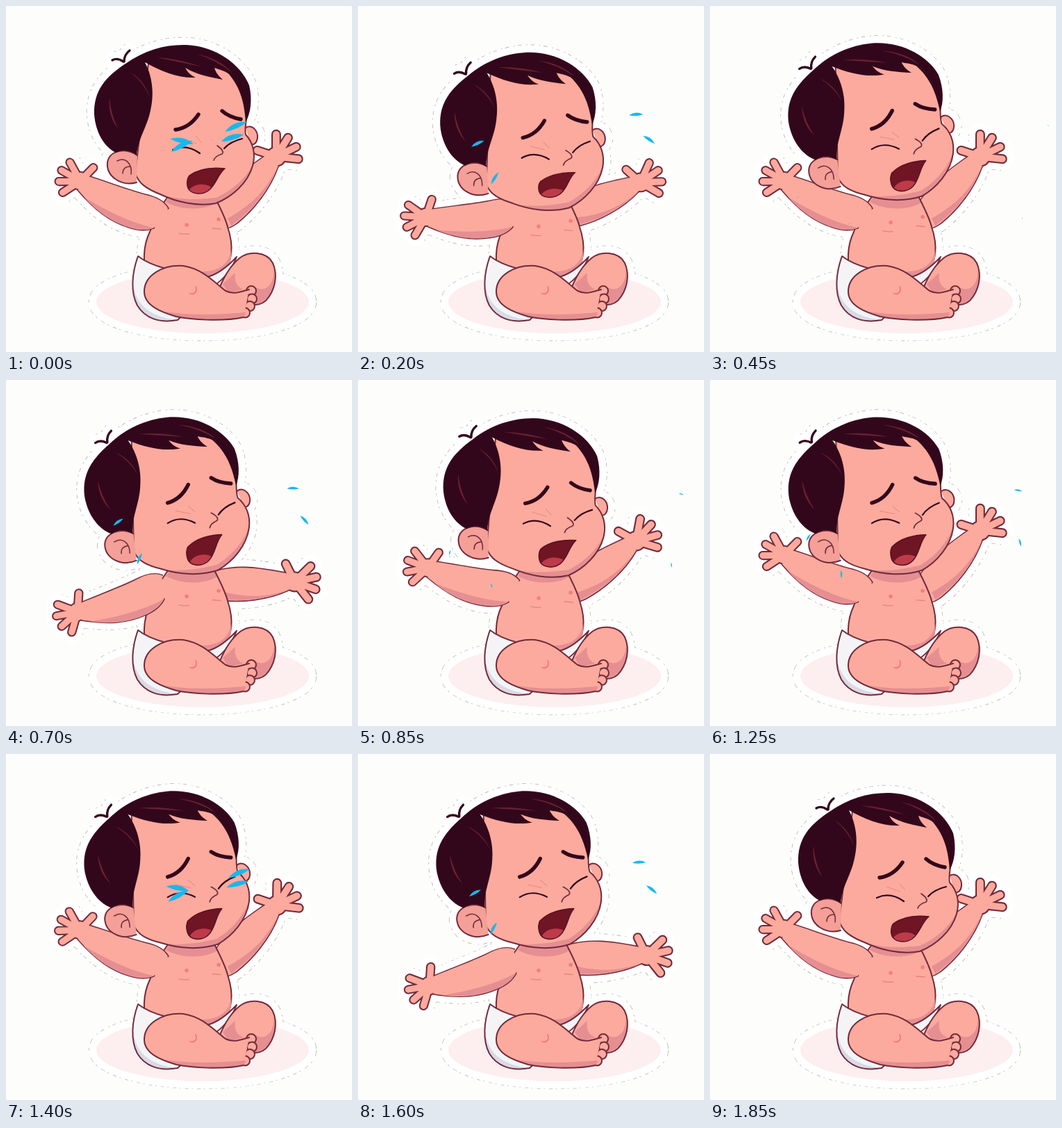
Recreate the animation shown at these times as an HTML page with a canvas. Size 498x498 px, loop 1900 ms.

```html
<!DOCTYPE html>
<html>
<head>
<meta charset="utf-8">
<title>Crying baby</title>
<style>
html, body { margin: 0; height: 100%; overflow: hidden; background: #fdfefc; }
canvas { display: block; }
</style>
</head>
<body>
<canvas id="stage" width="498" height="498"></canvas>
<script>
const ctx = document.getElementById('stage').getContext('2d');
const LOOP = 1900, STEP = 50, SWAY = 925, SOB = SWAY / 2;
const SKIN = '#fcaa9d', SHADE = '#e58f92', LINE = '#722a3b', HAIR = '#33071b', TEAR = '#17b8ee';
const RAD = Math.PI / 180;
const path = d => new Path2D(d);

const ground = new Path2D();
ground.ellipse(283, 426, 153, 45, 0, 0, 7);
const torso = path('M299 272 C308 290 316 305 319 318 C328 345 326 368 312 385 L290 398 L205 390 C196 375 197 345 207 325 C211 315 215 305 222 290 L236 270');
const neckShade = path('M230 282 C250 294 285 295 304 283 L298 270 L240 270Z');
const bellyShade = path('M324 350 C322 372 305 384 275 382 L300 396 C322 382 326 366 324 350Z');
const diaper = path('M190 360 C181 385 179 412 189 431 C200 449 220 457 247 452 L300 402 C315 392 326 376 332 361 C318 376 305 386 290 390 L230 378 C215 374 200 368 190 360Z');
const backLeg = path('M308 404 C316 385 325 372 336 363 C350 352 375 353 384 370 C392 388 387 410 374 424 C366 431 360 430 352 430 L318 412Z');
const backShade = path('M386 378 C386 405 370 412 360 405 L356 430 C372 431 393 405 386 378Z M312 400 L330 384 C328 395 332 405 342 408 L320 413Z');
const frontLeg = path('M350 408 C338 411 328 416 316 410 C298 396 282 378 255 374 C225 372 199 388 199 411 C199 432 225 441 245 447 C265 451 310 455 342 448');
const frontShade = path('M230 440 C265 446 310 444 346 441 L342 448 C310 454 265 451 245 447Z');
const leftArm = path('M228 284 C218 277 206 277 190 281 C165 286 140 288 107 293 L104 317 C140 333 165 337 190 333 C205 331 215 326 222 318');
const leftShade = path('M115 322 C140 333 165 337 190 333 C205 331 215 326 222 318 C190 326 150 326 115 322Z');
const rightArm = path('M298 282 C330 260 355 257 396 250 L402 270 C378 294 345 309 318 315 C305 317 298 315 292 312');
const rightShade = path('M310 315 C345 309 378 294 402 270 C372 294 345 302 310 304Z');
const face = path('M205 82 C260 70 330 80 346 130 C350 155 342 175 345 185 C355 196 360 212 355 230 C348 255 325 275 302 284 C275 289 245 282 222 271 C202 263 190 255 186 240Z');
const faceShade = path('M222 271 C245 279 275 279 302 276 C325 266 346 248 356 226 C350 253 325 275 302 284 C275 289 245 282 222 271Z');
const leftEar = path('M189 215 C172 203 149 208 146 225 C144 245 165 260 188 254');
const earFold = path('M160 223 C172 217 182 227 180 242 M168 241 C168 234 172 231 179 231');
const rightEar = path('M345 175 C355 170 363 180 362 190 C361 197 357 200 352 200');
const hair = path('M158 211 C142 203 129 183 127 156 C126 122 143 102 172 83 C200 63 230 55 260 56 C302 58 338 84 350 114 C355 135 352 155 345 167 C343 140 338 118 320 97 C314 93 308 92 300 89 C302 96 306 101 312 106 C292 102 275 99 258 89 C262 96 266 100 273 103 C248 104 225 95 200 81 C210 100 214 125 208 150 C203 175 190 190 188 215 C179 207 168 206 158 211Z');
const hairShine = path('M149 132 C147 150 152 165 161 176 Q151 156 149 132Z M180 96 Q200 108 207 132 Q198 110 180 96Z M217 74 Q250 76 280 87 Q250 81 217 74Z M275 69 Q308 76 325 96 Q303 78 275 69Z');
const sprig = path('M169 80 Q160 74 153 78 M170 80 Q170 70 178 64');
const brows = path('M244 178 C259 176 269 168 277 156 M311 151 Q321 160 338 163');
const eyes = path('M240 207 Q259 198 279 212 M314 205 Q323 195 340 191');
const creases = path('M254 191 L274 198 M273 187 L281 196');
const nose = path('M304 201 Q315 209 311 213 Q301 216 299 222');
const mouth = path('M264 244 C278 234 298 232 315 234 C304 243 303 257 291 266 C281 273 263 271 261 259 C260 252 261 248 264 244Z');
const tongue = path('M264 264 C272 255 287 255 296 261 C288 272 270 273 264 264Z');

// four fingers in a fan, the thumb set apart; side is 1 or -1
function makeHand(x, y, first, side) {
  const fingers = new Path2D();
  const add = (deg, r) => {
    fingers.moveTo(x, y);
    fingers.lineTo(x + r * Math.cos(deg * RAD), y + r * Math.sin(deg * RAD));
  };
  for (let i = 0; i < 4; i++) add(first + side * 32 * i, 30);
  add(first - side * 72, 27);
  return { fingers, palm: path(`M${x} ${y}h.1`) };
}
const leftHand = makeHand(101, 304, 216, -1);
const rightHand = makeHand(405, 258, -64, 1);

const foot = Array.from({ length: 4 }, (_, i) => {
  const toe = new Path2D();
  toe.arc(353 + 3 * i - 2 * i * i, 410 + 12 * i - i * i / 2, 7, 0, 7);
  return toe;
});

// start, velocity and acceleration per sob
const tears = [
  { x: 331, y: 174, vx: 160, vy: -71, ax: 0, ay: 71 },
  { x: 326, y: 190, vx: 284, vy: -85, ax: -161, ay: 210 },
  { x: 253, y: 195, vx: -232, vy: -52, ax: 105, ay: 138 },
  { x: 253, y: 202, vx: -190, vy: 100, ax: 140, ay: 15 }
];

const clamp = v => Math.min(1, Math.max(0, v));
const ease = v => clamp(v) ** 2 * (3 - 2 * clamp(v));
const bump = (p, a, b) => Math.sin(Math.PI * clamp((p - a) / (b - a))) ** 2;

function poseAt(p) {
  const lean = ease(p / 360) - ease((p - 710) / (SWAY - 710));
  const press = bump(p, 0, 290);
  const drop = bump(p, 455, SWAY);
  return {
    tilt: -8 * lean,
    hx: -6.5 * lean,
    hy: 18 * press - 10 * lean,
    open: 1 - .2 * press + .08 * lean,
    left: 26 - 38 * press - 41 * drop,
    right: 26 - 35 * press - 46 * drop,
    reach: 1.07 - .06 * press
  };
}

function turned(x, y, deg, sx, sy, draw, dx = 0, dy = 0) {
  ctx.save();
  ctx.translate(x + dx, y + dy);
  ctx.rotate(deg * RAD);
  ctx.scale(sx, sy);
  ctx.translate(-x, -y);
  draw();
  ctx.restore();
}

function fill(shape, color) {
  ctx.fillStyle = color;
  ctx.fill(shape);
}

function stroke(shape, color = LINE, width = 2) {
  ctx.strokeStyle = color;
  ctx.lineWidth = width;
  ctx.stroke(shape);
}

function skin(shape, shade, color = SKIN) {
  fill(shape, color);
  if (shade) fill(shade, SHADE);
  stroke(shape);
}

function strokeHand(hand, color, extra) {
  stroke(hand.fingers, color, 9 + extra);
  stroke(hand.palm, color, 24 + extra);
}

function drawArm(arm, hand, shade) {
  strokeHand(hand, LINE, 4);
  stroke(arm, LINE, 3);
  strokeHand(hand, SKIN, 0);
  fill(arm, SKIN);
  fill(shade, SHADE);
}

function dot(x, y) {
  stroke(path(`M${x} ${y}h.1`), '#f37f7d', 5.5);
}

function drawChest() {
  dot(260, 315);
  dot(306, 307);
  stroke(path('M249 327 Q256 329 263 328 M297 320 L309 321'), '#e9817f', 1.3);
}

function drawLegs() {
  fill(diaper, '#f4f4f7');
  fill(path('M183 400 C187 432 210 448 247 452 C215 459 182 443 183 400Z'), '#d9dae3');
  stroke(diaper);
  skin(backLeg, backShade);
  foot.forEach(toe => skin(toe));
  skin(frontLeg, frontShade);
  stroke(path('M265 414 C272 416 276 410 273 404'), '#f0706f', 1.5);
}

function drawHead(open) {
  skin(rightEar);
  skin(face, faceShade);
  skin(leftEar, null, '#f49f97');
  stroke(earFold, LINE, 1.5);
  fill(hair, HAIR);
  fill(hairShine, '#6a2030');
  stroke(sprig, HAIR, 3.4);
  stroke(creases, '#e98b83', 1);
  stroke(brows, HAIR, 5.4);
  stroke(eyes, HAIR, 2.2);
  stroke(nose, LINE, 1.7);
  turned(285, 234, 0, 1, open, () => {
    fill(mouth, '#701524');
    fill(tongue, '#bd3b49');
    stroke(mouth, '#571224', 1.5);
  });
}

function drawTear(tear, q) {
  const x = tear.x + tear.vx * q + tear.ax * q * q;
  const y = tear.y + tear.vy * q + tear.ay * q * q;
  const slope = (tear.vy + 2 * tear.ay * q) / (tear.vx + 2 * tear.ax * q);
  const h = 17 * clamp(1 - .93 * q);
  turned(0, 0, Math.atan(slope) / RAD, 1, 1, () => {
    const drop = new Path2D();
    drop.moveTo(-h, 0);
    drop.quadraticCurveTo(0, -h * .58, h, 0);
    drop.quadraticCurveTo(0, h * .3, -h, 0);
    fill(drop, TEAR);
  }, x, y);
}

function render(t) {
  const { tilt, hx, hy, open, left, right, reach } = poseAt(t % SWAY);
  const atLeft = f => turned(215, 298, left, 1.03, 1, f);
  const atRight = f => turned(315, 285, -right, reach, reach, f);
  const atHead = f => turned(305, 217, tilt, 1, 1, f, hx, hy);
  const outline = (color, width) => {
    const edge = s => stroke(s, color, width);
    [ground, torso, backLeg].forEach(edge);
    atLeft(() => { edge(leftArm); strokeHand(leftHand, color, width); });
    atRight(() => { edge(rightArm); strokeHand(rightHand, color, width); });
    atHead(() => [face, hair, leftEar, rightEar, sprig].forEach(edge));
  };

  ctx.fillStyle = '#fdfefc';
  ctx.fillRect(0, 0, 498, 498);
  ctx.lineJoin = 'round';
  // broken sticker edge
  ctx.lineCap = 'butt';
  ctx.setLineDash([5, 6, 2, 4]);
  outline('#b4b4b4', 22.5);
  ctx.setLineDash([]);
  ctx.lineCap = 'round';
  outline('#fff', 21);

  fill(ground, '#fdefef');
  atRight(() => drawArm(rightArm, rightHand, rightShade));
  skin(torso, neckShade);
  fill(bellyShade, SHADE);
  turned(0, 0, 0, 1, 1, drawChest, 0, hy * .35);
  drawLegs();
  atLeft(() => drawArm(leftArm, leftHand, leftShade));
  atHead(() => drawHead(open));
  // the last sob ends dry
  if (t < SWAY * 2) tears.forEach(tear => drawTear(tear, t % SOB / SOB));
}

const start = performance.now();
function frame() {
  const t = (performance.now() - start) % LOOP;
  render(Math.floor(t / STEP) * STEP);
  requestAnimationFrame(frame);
}
frame();
</script>
</body>
</html>
```
